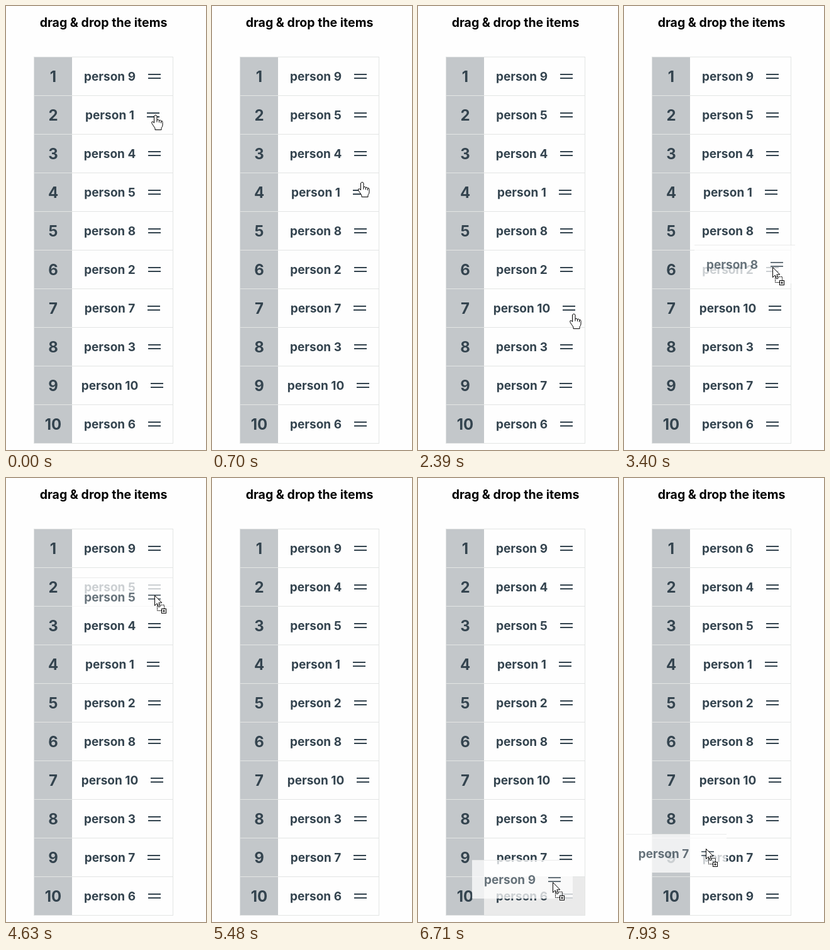
Recreate the animation shown at these times as an HTML page with a canvas. Size 318 px wide and 701 px high, loop 7990 ms.

```html
<!DOCTYPE html>
<html lang="en">
<head>
<meta charset="utf-8">
<title>Drag and drop list</title>
<style>
  html, body { margin: 0; width: 100%; height: 100%; overflow: hidden; background: #fefefe; }
  canvas { display: block; }
</style>
</head>
<body>
<canvas id="stage" width="318" height="701"></canvas>
<script>
const ctx = document.getElementById('stage').getContext('2d');
const LOOP = 7990, ROW = 61, TOP = 80, LEFT = 105, WIDTH = 160, MID = 165;
const INK = '#34444f', LINE = '#e3e5e4', PAPER = '#fefefe', COLUMN = '#c3c7ca', OVER = '#eaeaea';
const FONT = 'Inter, "Open Sans", sans-serif';
const FIRST_ORDER = [9, 1, 4, 5, 8, 2, 7, 3, 10, 6];
const REST = [238, 172];

// Pointer moves; those with "from" carry a row and swap it with "to" at "drop".
const acts = [
  { start: 90, end: 480, steps: 7, from: 1, to: 3, drop: 700, grab: [238, 172],
    path: [[238, 188], [239, 242], [239, 278]] },
  { start: 880, end: 1430, steps: 9,
    path: [[240, 281], [270, 390], [280, 500], [268, 592], [259, 598]] },
  { start: 1640, end: 2190, steps: 9, from: 8, to: 6, drop: 2190, grab: [259, 598],
    path: [[259, 594], [256, 522], [250, 506], [244, 496], [253, 486]] },
  { start: 2390, end: 2870, steps: 9,
    path: [[248, 486], [240, 420], [231, 370], [229, 359]] },
  { start: 3070, end: 3580, steps: 8, from: 4, to: 5, drop: 3580, grab: [229, 359],
    path: [[230, 366], [235, 392], [236, 418], [236, 426]] },
  { start: 3790, end: 4510, steps: 13,
    path: [[238, 424], [288, 380], [296, 300], [270, 210], [236, 169]] },
  { start: 4630, end: 4910, steps: 5, from: 1, to: 2, drop: 5060, grab: [236, 169],
    path: [[236, 185], [238, 210], [239, 222]] },
  { start: 5060, end: 5480, steps: 7,
    path: [[240, 224], [262, 270], [300, 345], [340, 400]] },
  { start: 5790, end: 6090, steps: 6,
    path: [[306, 250], [262, 160], [238, 112], [233, 115]] },
  { start: 6270, end: 6830, steps: 10, from: 0, to: 9, drop: 6980, grab: [233, 115],
    path: [[232, 142], [220, 400], [214.5, 610], [215, 653]] },
  { start: 7140, end: 7660, steps: 9,
    path: [[222, 651], [285, 640], [290, 615], [255, 595], [232, 591]] },
  { start: 7840, end: 7930, steps: 2, from: 8, to: 8, drop: LOOP, grab: [232, 591],
    path: [[190, 585], [130, 585]] }
];

const hand = new Path2D('M-2.5 1.5Q0-1.5 2 1.5V8Q4 6.5 5.5 8.5Q7.5 7.3 8.5 9.5Q11 8.8 11 11.5V16Q11 18.5 9 20.5V23.5H-1V21L-6 13.5Q-7 10-4.5 10.5L-2.5 12.5Z');
const arrow = new Path2D('M.5.5V16.5L4.2 13L6.7 18.8L9.3 17.7L6.8 12H11.8Z');

function along(path, p) {
  const last = path.length - 1;
  const i = Math.min(last - 1, Math.floor(p * last));
  const u = p * last - i;
  const at = n => path[Math.max(0, Math.min(last, n))];
  const [a, b, c, d] = [at(i - 1), at(i), at(i + 1), at(i + 2)];
  return [0, 1].map(k => b[k] + u / 2 * (c[k] - a[k]
    + u * (2 * a[k] - 5 * b[k] + 4 * c[k] - d[k] + u * (3 * (b[k] - c[k]) + d[k] - a[k]))));
}

function pointerAt(act, t) {
  if (!act) return REST;
  const last = act.steps - 1;
  const step = Math.floor((t - act.start) / (act.end - act.start) * last + 0.15);
  return along(act.path, Math.min(last, step) / last);
}

function orderAt(t) {
  const order = [...FIRST_ORDER];
  for (const { from, to, drop } of acts) {
    if (t >= drop) [order[from], order[to]] = [order[to], order[from]];
  }
  return order;
}

function text(str, x, baseline, size, color = INK) {
  ctx.font = `700 ${size}px ${FONT}`;
  ctx.textAlign = 'center';
  ctx.fillStyle = color;
  ctx.fillText(str, x, baseline);
}

function rect(x, y, w, h, color) {
  ctx.fillStyle = color;
  ctx.fillRect(x, y, w, h);
}

function handleX(person) {
  ctx.font = `700 19px ${FONT}`;
  return Math.round(MID + ctx.measureText('person ' + person).width / 2 + 20);
}

function item(person, y, color) {
  rect(LEFT, y, WIDTH, ROW, color);
  rect(LEFT, y, WIDTH, 1, LINE);
  text('person ' + person, MID, y + 38, 19);
  const x = handleX(person);
  rect(x, y + 27, 20, 2, INK);
  rect(x, y + 33, 20, 2, INK);
}

// A row stays lit until the pointer runs into its handle.
function litRow(act, [x, y], order) {
  const row = Math.floor((y - TOP) / ROW);
  if (row === act.from || row < 0 || row > 9) return -1;
  const hx = handleX(order[row]);
  const depth = (y - (TOP + row * ROW + 31)) * Math.sign(act.to - act.from);
  return x > hx - 1 && x < hx + 21 && depth > -6 ? -1 : row;
}

function shape(path) {
  ctx.fillStyle = '#fff';
  ctx.strokeStyle = '#000';
  ctx.lineWidth = 1;
  ctx.fill(path);
  ctx.stroke(path);
}

function drawPointer([x, y], dragging) {
  ctx.save();
  ctx.translate(Math.round(x), Math.round(y));
  if (dragging) {
    shape(arrow);
    ctx.setLineDash([2, 1]);
    ctx.strokeRect(4.5, 15.5, 11, 9);
    ctx.setLineDash([]);
    rect(11, 21, 8, 8, '#fff');
    ctx.strokeRect(11.5, 21.5, 7, 7);
    rect(13, 24.5, 4, 1, '#000');
    rect(14.5, 23, 1, 4, '#000');
  } else {
    shape(hand);
    ctx.beginPath();
    for (const [lx, ly] of [[2, 8], [5.5, 8.5], [8.5, 9.5]]) {
      ctx.moveTo(lx, ly);
      ctx.lineTo(lx, ly + 3.5);
    }
    ctx.stroke();
  }
  ctx.restore();
}

function draw(t) {
  const act = acts.filter(a => a.start <= t).pop();
  const pointer = pointerAt(act, t);
  const order = orderAt(t);
  const dragging = Boolean(act && act.grab && t < act.drop);
  const lit = dragging ? litRow(act, pointer, order) : -1;

  rect(0, 0, 318, 701, PAPER);
  text('drag & drop the items', 155, 33, 19.5, '#000');
  rect(45, TOP, 60, 10 * ROW, COLUMN);
  order.forEach((person, i) => {
    const y = TOP + i * ROW;
    item(person, y, i === lit ? OVER : PAPER);
    rect(45, y, 60, 1, LINE);
    text(i + 1, 75, y + 40, 24);
  });
  rect(44, TOP + 10 * ROW, 222, 1, LINE);
  rect(44, TOP, 1, 10 * ROW, LINE);
  rect(265, TOP, 1, 10 * ROW, LINE);

  if (dragging) {
    ctx.save();
    ctx.globalAlpha = 0.75;
    ctx.translate(Math.round(pointer[0] - act.grab[0]), Math.round(pointer[1] - act.grab[1]));
    item(order[act.from], TOP + act.from * ROW, PAPER);
    ctx.restore();
  }
  drawPointer(pointer, dragging);
}

const begin = performance.now();
function tick() {
  draw((performance.now() - begin) % LOOP);
  requestAnimationFrame(tick);
}
tick();
</script>
</body>
</html>
```
